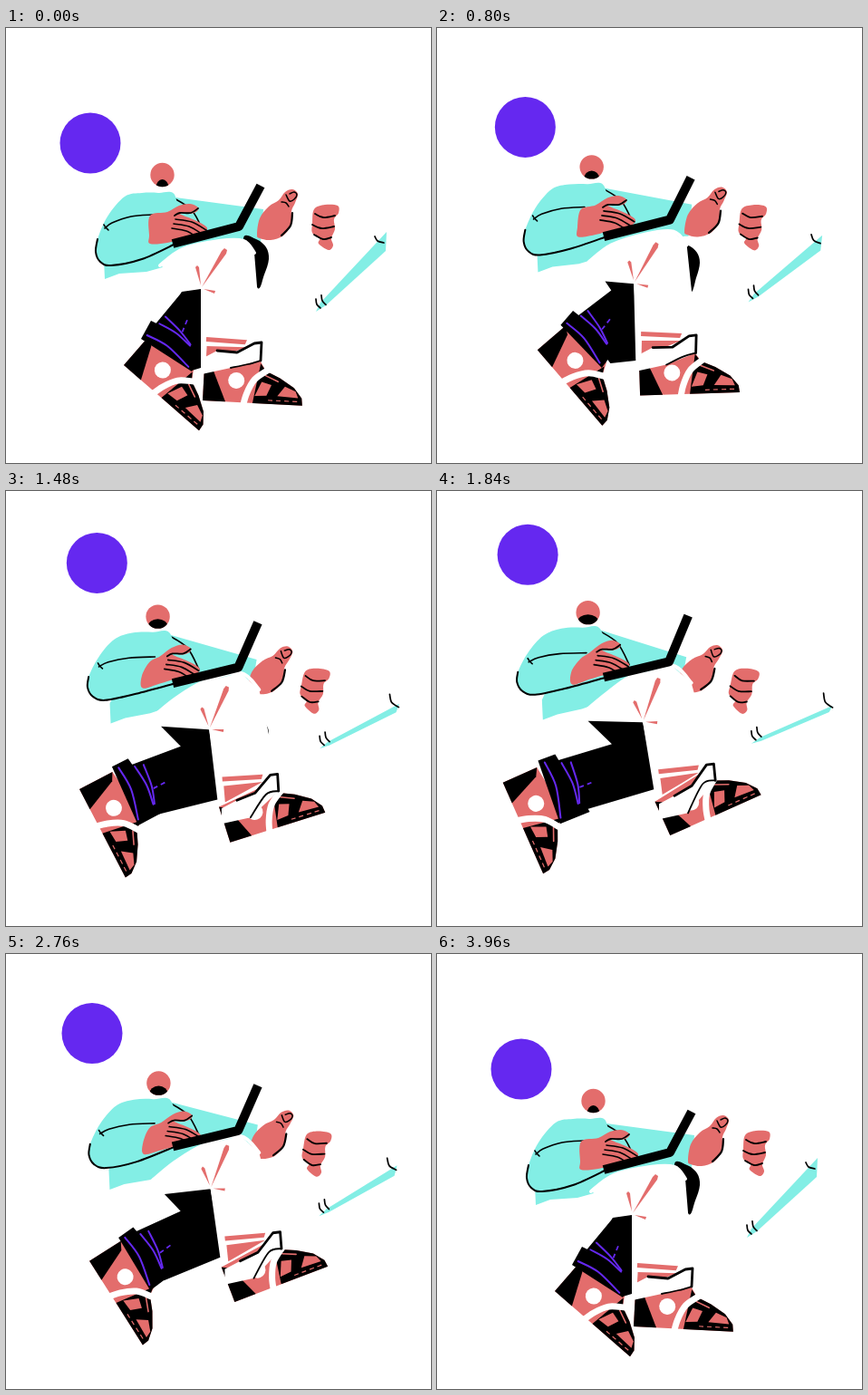
Animation, 469 px wide and 480 px high, one loop 4000 ms. Source, as an HTML page with a canvas:

```html
<!DOCTYPE html>
<html lang="en">
<head>
<meta charset="utf-8">
<title>Running figure</title>
<style>
html, body { margin: 0; width: 100%; height: 100%; overflow: hidden; background: #fff; }
canvas { display: block; width: 469px; height: 480px; }
</style>
</head>
<body>
<canvas id="stage" width="469" height="480"></canvas>
<script>
const ctx = document.getElementById("stage").getContext("2d");
const LOOP = 4000, STEP = 40, HOLD = 80, STRIDE = 3880;
const CORAL = "#e36d6c", CYAN = "#83eee5", PURPLE = "#6528f0", BLACK = "#000", WHITE = "#fff";
const LEG_LAG = 0.15;
let phase = 0;

// 0 at rest, 1 at full stride; lag makes a part follow later, also on the way back.
const swing = (lag = 0) => (1 - Math.cos(phase)) / 2 - lag * Math.sin(phase);

function mix(rest, stride, lag) {
  const s = swing(lag);
  return rest.map((v, i) => v + (stride[i] - v) * s);
}

// Points come as a flat list x, y, x, y ...
function trace(p, curved, closed) {
  const n = p.length / 2;
  const at = i => {
    const k = closed ? (i + n) % n : Math.min(Math.max(i, 0), n - 1);
    return [p[2 * k], p[2 * k + 1]];
  };
  ctx.beginPath();
  ctx.moveTo(p[0], p[1]);
  for (let i = 0; i < (closed ? n : n - 1); i++) {
    const [a, b, c, d] = [at(i - 1), at(i), at(i + 1), at(i + 2)];
    if (curved) {
      ctx.bezierCurveTo(b[0] + (c[0] - a[0]) / 6, b[1] + (c[1] - a[1]) / 6,
        c[0] - (d[0] - b[0]) / 6, c[1] - (d[1] - b[1]) / 6, c[0], c[1]);
    } else ctx.lineTo(...c);
  }
}

function shape(color, p, curved = false) {
  trace(p, curved, true);
  ctx.fillStyle = color;
  ctx.fill();
}

function line(color, width, p, curved = true, cap = "round") {
  trace(p, curved, false);
  ctx.strokeStyle = color;
  ctx.lineWidth = width;
  ctx.lineCap = cap;
  ctx.stroke();
}

function dashes(color, width, p) {
  ctx.setLineDash([5, 4]);
  line(color, width, p, true, "butt");
  ctx.setLineDash([]);
}

function oval(color, x, y, rx, ry = rx) {
  ctx.beginPath();
  ctx.ellipse(x, y, rx, ry, 0, 0, 2 * Math.PI);
  ctx.fillStyle = color;
  ctx.fill();
}

function place([x, y, deg = 0], draw) {
  ctx.save();
  ctx.translate(x, y);
  ctx.rotate(deg * Math.PI / 180);
  draw();
  ctx.restore();
}

function badge() {
  oval(PURPLE, 93 + 6.5 * swing(-0.4), 127 - 58 * swing(), 33.5);
}

function head() {
  const [x, y, top, w] = mix([172.5, 162, 5, 7], [166.5, 133.5, 2, 12]);
  ctx.save();
  ctx.beginPath();
  ctx.arc(x, y, 13.2, 0, 2 * Math.PI);
  ctx.clip();
  oval(CORAL, x, y, 14);
  oval(BLACK, x, y + top + 9, w, 9);
  ctx.restore();
}

function wand() {
  const body = mix([342, 313, 347, 303, 420, 225, 419, 246, 353, 306],
    [347, 278, 357, 271, 437, 237, 433, 244, 358, 275]);
  shape(CYAN, body);
  const [x, y] = body;
  for (const d of [0, 6]) {
    line(BLACK, 1.7, [x + d, y - 14 - d * 0.7, x + d + 1, y - 8 - d * 0.7, x + d + 5, y - 4 - d * 0.6]);
  }
  line(BLACK, 1.7, mix([407, 230, 410, 235, 417, 237], [427, 223, 429, 233, 437, 239]));
}

function fist() {
  place(mix([352, 220, 0], [336.5, 220.5, 10]), () => {
    shape(CORAL, [-12, -20, 0, -25, 14, -24, 15, -16, 10, -9, 11, 2, 7, 12, 9, 20, 4, 25,
      -7, 18, -6, 12, -14, 6, -14, -4], true);
    line(BLACK, 1.8, [-11, -15, -2, -11, 11, -13]);
    line(BLACK, 1.8, [-14, -3, -4, 1, 10, -1]);
    line(BLACK, 1.8, [-12, 8, -2, 13, 7, 11]);
  });
}

function torso() {
  const [sx, sy, hx, hy, lx, ly, wx, wy, mx, my] = mix(
    [187, 187, 284, 200, 277, 236, 155, 269, 109, 277], [181, 153, 275, 183, 265, 215, 160, 240, 117, 252]);
  shape(CYAN, [sx, sy, hx, hy, lx + 4, ly, lx, ly, 200, wy - 14, 180, wy - 7, wx, wy, mx + 16, my - 6,
    mx, my, mx - 1, my - 22, sx - 30, sy]);
  line(BLACK, 1.6, [sx - 3, sy, sx + 18, sy + 14, sx + 31, sy + 38]);
}

function sleeve(endX, endY) {
  const arm = mix([187, 186, 168, 182, 150, 182, 131, 186, 112, 208, 101, 233, 99, 247, 104, 258, 116, 262, 150, 255],
    [181, 153, 160, 150, 137, 151, 117, 159, 100, 178, 89, 199, 88, 210, 94, 220, 108, 224, 142, 217]);
  shape(CYAN, [...arm, endX + 3, endY - 2], true);
  line(BLACK, 2, [...arm.slice(10), endX + 3, endY]);
  const crease = mix([109, 221, 117, 215, 138, 208, 162, 206], [101, 188, 112, 183, 135, 179, 165, 178]);
  line(BLACK, 1.6, crease);
  const [x, y] = crease;
  line(BLACK, 1.6, [x - 1, y - 4, x + 1, y - 1, x + 4, y + 2]);
}

function typingHand() {
  const s = swing();
  place(mix([158, 194], [148, 164]), () => {
    shape(CORAL, [1 + 9 * s, 13 + 8 * s, 20, 9 + 5 * s, 33, 2 + 2 * s, 45, 0, 54, 4, 53, 8, 46, 11, 34, 11,
      48, 17, 60, 23, 64, 28, 56, 35, 38, 38, 20, 43, 1, 44 + 5 * s, 0, 35], true);
    line(BLACK, 1.8, [54, 5, 46, 10, 34, 10, 28, 13]);
    for (let i = 0; i < 3; i++) {
      line(BLACK, 1.6, [29 - 2 * i, 17 + 5 * i, 47 - 3 * i, 20 + 5 * i, 63 - 5 * i, 29 + 4 * i]);
    }
  });
}

function farHand() {
  place(mix([316, 184, 0], [309, 176, 8]), () => {
    shape(CORAL, [-39, 44, -36, 26, -26, 13, -15, 6, -8, -3, 0, -6, 6, -1, 3, 9, -1, 18, -1, 32,
      -10, 45, -24, 50, -36, 48], true);
    line(BLACK, 2.2, [0, 20, -2, 34, -12, 45]);
    line(BLACK, 1.5, [-7, 0, -3, 7, 2, 5, 5, 0, 2, -3, -3, -1]);
    line(BLACK, 1.5, [-12, 8, -7, 9, -4, 13]);
  });
}

// Origin at the heel, sole along the x axis.
function shoe(pose) {
  place(pose, () => {
    shape(CORAL, [0, 0, 0, -41, 60, -49, 68, -36, 84, -29, 100, -19, 109, -8, 110, 0]);
    shape(BLACK, [0, 0, 0, -41, 9, -36, 25, 0]);
    shape(BLACK, [55, 0, 62, -44, 68, -36, 84, -29, 100, -19, 109, -8, 110, 0]);
    shape(CORAL, [57, -8, 64, -24, 75, -21, 70, -9]);
    shape(CORAL, [82, -9, 90, -20, 102, -15, 105, -8]);
    line(CORAL, 1.6, [68, -31, 82, -25], false);
    dashes(CORAL, 1.2, [72, -4, 106, -4]);
    oval(WHITE, 36, -24, 9);
    line(WHITE, 7, [44, 7, 48, -10, 56, -26, 70, -37]);
  });
}

function backLeg(knee) {
  shoe(mix([130, 372, 41], [72, 321, 66.5], -0.03));
  const [kx, ky, bx, by] = knee;
  const thigh = mix([194, 291, 192, 294, 163, 329, 205, 378], [166, 253, 193, 279, 131, 297, 160, 352]);
  shape(BLACK, [...thigh, bx, by, kx, ky]);
  const cuff = mix([149, 343, 160, 323, 215, 350, 205, 379], [111, 297, 130, 290, 168, 354, 135, 367], -0.03);
  shape(BLACK, cuff);

  // u runs across the cuff, v along it.
  const on = (u, v) => [0, 1].map(i =>
    (cuff[i] * (1 - u) + cuff[2 + i] * u) * (1 - v) + (cuff[6 + i] * (1 - u) + cuff[4 + i] * u) * v);
  line(PURPLE, 2, [...on(0.3, 0.06), ...on(0.35, 0.45), ...on(0.08, 0.92)]);
  line(PURPLE, 2, [...on(1.05, 0.16), ...on(1, 0.5), ...on(0.8, 0.82)]);
  line(PURPLE, 2, [...on(1.45, 0.2), ...on(1.15, 0.55), ...on(0.85, 0.82)]);
  dashes(PURPLE, 1.8, [...on(1.15, 0.6), ...on(1.75, 0.6)]);
}

function frontLeg([kx, ky]) {
  shape(BLACK, mix([262, 233, 276, 233, 287, 242, 290, 255, 285, 272, 277, 286],
    [272, 248, 280, 255, 286, 260, 290, 268, 289, 282, 283, 300]), true);
  const [tx, ty, bx, by, lx, ly] = mix([282, 347, 281, 367, 218, 379], [307, 298, 309, 316, 249, 358], LEG_LAG);
  const hip = mix([170, 262, 195, 244, 235, 235, 262, 235, 274, 248],
    [160, 245, 185, 224, 215, 202, 258, 190, 281, 210], 0.08);
  shape(WHITE, [...hip, tx, ty, bx, by, lx, ly, kx, ky]);
  line(WHITE, 4, hip);

  shoe(mix([217, 411, 3], [260, 378, -26], LEG_LAG));
  place(mix([221, 343, 3], [246, 307, -8], LEG_LAG), () => {
    shape(CORAL, [0, -2, 45, -1, 43, 4, 0, 3]);
    shape(CORAL, [1, 8, 44, 7, 24, 16, 1, 26]);
  });
  const ridge = [lx + 15, ly - 23, (lx + tx) / 2 + 5, (ly + ty) / 2 - 5, tx - 8, ty + 1];
  shape(WHITE, [lx - 2, ly - 14, ...ridge, tx, ty, bx, by, lx + 30, ly - 4, lx - 2, ly + 3]);
  line(BLACK, 2.8, [...ridge, tx, ty, bx, by], false);
  line(BLACK, 1.8, [bx, by, bx - 14, by + 4, lx + 30, ly - 4]);

  place([kx + 1, ky, -13 * swing(LEG_LAG)], () => {
    shape(CORAL, [0, -2, 22, -42, 25, -45, 28, -43, 27, -39]);
    shape(CORAL, [-1, -4, -7, -24, -5, -26, -3, -24]);
    shape(CORAL, [2, 0, 15, 2, 14, 5]);
  });
}

function render() {
  ctx.fillStyle = WHITE;
  ctx.fillRect(0, 0, 469, 480);
  ctx.lineJoin = "round";
  const laptop = mix([184, 238, 257, 219, 281, 174], [184, 204, 256, 187, 277, 136], 0.08);
  const knee = mix([215, 288, 215, 375], [228, 253, 241, 326], LEG_LAG);
  badge();
  head();
  wand();
  fist();
  torso();
  farHand();
  backLeg(knee);
  frontLeg(knee);
  sleeve(laptop[0], laptop[1]);
  typingHand();
  line(BLACK, 10, laptop, false, "butt");
}

const start = performance.now();
function tick() {
  const elapsed = (performance.now() - start) % LOOP;
  const frameTime = Math.floor(elapsed / STEP) * STEP;
  phase = 2 * Math.PI * Math.min(Math.max((frameTime - HOLD) / STRIDE, 0), 1);
  render();
  requestAnimationFrame(tick);
}
tick();
</script>
</body>
</html>
```
